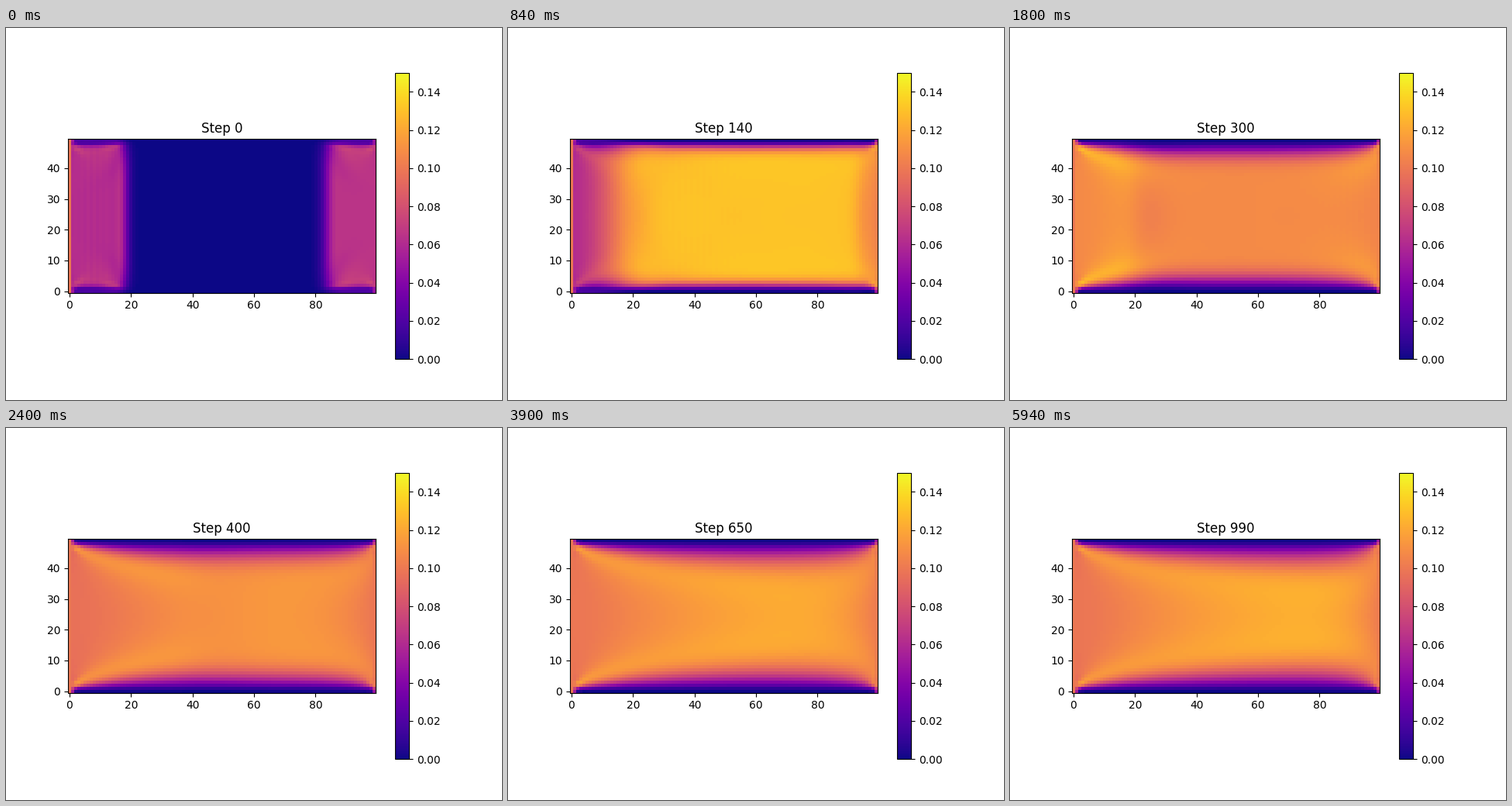
These frames come from a looping animation (640x480 px, 6 s). A matplotlib script:

```python
import numpy as np
import matplotlib.pyplot as plt
from matplotlib.animation import FuncAnimation

# Lattice Boltzmann channel flow (D2Q9), periodic in x, solid walls in y
NX, NY = 100, 50
TAU = 0.6
U_IN = 0.1
FRAMES, STEPS, WARMUP = 100, 10, 30

CX = np.array([0, 1, 0, -1, 0, 1, -1, -1, 1])
CY = np.array([0, 0, 1, 0, -1, 1, 1, -1, -1])
W = np.array([4 / 9] + [1 / 9] * 4 + [1 / 36] * 4)
OPP = [0, 3, 4, 1, 2, 7, 8, 5, 6]
WALLS = [0, NY - 1]


def equilibrium(rho, ux, uy):
    cu = 3 * (CX[:, None, None] * ux + CY[:, None, None] * uy)
    return W[:, None, None] * rho * (1 + cu + cu**2 / 2 - 1.5 * (ux**2 + uy**2))


def macroscopic(f):
    rho = f.sum(axis=0)
    ux = np.tensordot(CX, f, 1) / rho
    uy = np.tensordot(CY, f, 1) / rho
    return rho, ux, uy


INLET = equilibrium(np.ones((NY, 1)), U_IN, 0.0)


def advance(f):
    out = f + (equilibrium(*macroscopic(f)) - f) / TAU
    out[:, WALLS] = f[OPP][:, WALLS]
    out[:, :, :1] = INLET
    for i in range(1, 9):
        out[i] = np.roll(out[i], (CY[i], CX[i]), axis=(0, 1))
    out[:, :, :1] = INLET
    return out


def simulate():
    f = equilibrium(np.ones((NY, NX)), np.zeros((NY, NX)), np.zeros((NY, NX)))
    speeds = []
    for step in range(1, WARMUP + STEPS * (FRAMES - 1) + 1):
        f = advance(f)
        if step >= WARMUP and (step - WARMUP) % STEPS == 0:
            _, ux, uy = macroscopic(f)
            speeds.append(np.hypot(ux, uy))
    return speeds


speeds = simulate()

fig, ax = plt.subplots(figsize=(6.4, 4.8), dpi=100)
image = ax.imshow(speeds[0], origin="lower", cmap="plasma", vmin=0, vmax=0.15)
fig.colorbar(image, ax=ax)
title = ax.set_title("Step 0")


def update(frame):
    image.set_data(speeds[frame])
    title.set_text(f"Step {frame * STEPS}")
    return image, title


anim = FuncAnimation(fig, update, frames=FRAMES, interval=60,
                     repeat=True, repeat_delay=0, blit=False)
plt.show()
```
